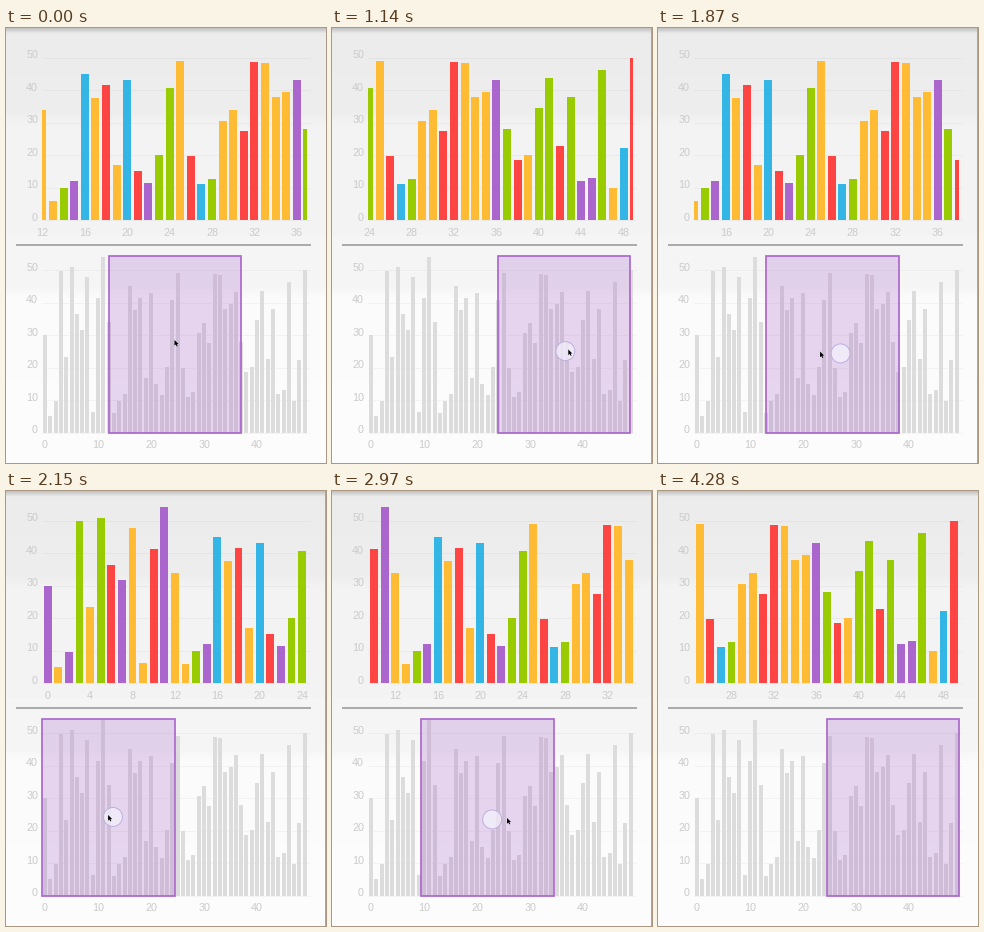
Animation, 320 px wide and 435 px high, one loop 4.35 s. Source, as a matplotlib script:

```python
import numpy as np
import matplotlib.pyplot as plt
from matplotlib.animation import FuncAnimation
from matplotlib.patches import Circle, Polygon, Rectangle

W, H, DPI = 320, 435, 80
LOOP, INTERVAL, STEP = 4350, 30, 90   # the picture moves once per STEP ms
LEFT, RIGHT = 36.4, 301.4
TOP_BASE, LOW_BASE = 192, 404.5
UNIT = 3.25                           # pixels per value
SPAN = 25                             # columns in view
BAR_FILL = 0.75
POINTER_LEAD = 60                     # ms the pointer runs ahead of the finger
VIOLET = "#AA66CC"
PALETTE = {"b": "#33B5E5", "v": VIOLET, "g": "#99CC00",
           "o": "#FFBB33", "r": "#FF4444"}

# The charted data set and the hue of each column
VALUES = [30, 5, 9.6, 49.8, 23.3, 50.8, 36.4, 31.6, 47.8, 6.2,
          41.3, 54.1, 34, 5.9, 9.7, 12, 45, 37.6, 41.4, 16.8,
          43, 15, 11.5, 20.1, 40.7, 49, 19.8, 11, 12.6, 30.5,
          33.7, 27.5, 48.7, 48.4, 38, 39.5, 43.2, 28, 18.5, 20.1,
          34.6, 43.6, 22.7, 37.9, 11.9, 13, 46.3, 9.7, 22.3, 50]
HUES = "vovgogrvoorvoogvborobrvggorbgoorrooovgroggrgvvgobr"
COUNT = len(VALUES)

# Turning points of the drag: time, first column in view, finger x, finger y
STOPS = np.array([(300, 12, 168.5, 314), (630, 12, 166, 315),
                  (1250, 24.5, 236.5, 323.5), (1600, 24.5, 246, 325),
                  (2230, -1.5, 102, 326), (2590, -1.5, 102, 326),
                  (3470, 26, 248, 332)])
EXIT_START, EXIT_TIME, EXIT_WAY = 3420, 600, np.array([75, 110])
ARROW = 0.8 * np.array([(0, 0), (0, 7), (1.7, 5.6), (2.9, 8),
                        (4, 7.5), (3, 5.1), (5, 5)])

fig = plt.figure(figsize=(W / DPI, H / DPI), dpi=DPI)
ax = fig.add_axes([0, 0, 1, 1])
ax.set_axis_off()


def drag(time):
    """First column and finger position, eased between the turning points."""
    times = STOPS[:, 0]
    i = np.clip(np.searchsorted(times, time) - 1, 0, len(times) - 2)
    u = np.clip((time - times[i]) / (times[i + 1] - times[i]), 0, 1)
    ease = u * u * (3 - 2 * u)
    first, *finger = STOPS[i, 1:] + ease * (STOPS[i + 1, 1:] - STOPS[i, 1:])
    return np.clip(first, -0.5, COUNT - SPAN - 0.5), np.array(finger)


def pointer_tip(time):
    u = np.clip((time - EXIT_START) / EXIT_TIME, 0, 1)
    return drag(time + POINTER_LEAD)[1] + (0, -2) + EXIT_WAY * u * (2 - u)


def label(x, y, value, align="center"):
    return ax.text(x, y, str(value), ha=align, va="baseline", color="#CBCBCB",
                   fontsize=10.8 * 72 / DPI, family="Liberation Sans", zorder=2)


def line(x0, x1, y, color, width):
    ax.plot([x0, x1], [y, y], color=color, lw=width * 72 / DPI,
            solid_capstyle="butt", zorder=1)


def place_bars(bars, first, span):
    """Lay out the columns from `first` on, cut off at the chart's sides."""
    pitch = (RIGHT - LEFT) / span
    for i, bar in enumerate(bars):
        center = LEFT + (i - first) * pitch
        half = pitch * BAR_FILL / 2
        x0, x1 = np.clip([center - half, center + half], LEFT, RIGHT)
        bar.set_x(x0)
        bar.set_width(x1 - x0)


def make_chart(base, colors):
    for value in range(0, 60, 10):
        y = base - value * UNIT
        line(36, 304, y, (0, 0, 0, 0.035), 1)
        label(32, y + 0.6, value, "right")
    bars = [Rectangle((0, base - v * UNIT), 0, v * UNIT, fc=c, lw=0, zorder=3)
            for v, c in zip(VALUES, colors)]
    for bar in bars:
        ax.add_patch(bar)
    return bars


shade = np.interp(np.arange(H), [0, 5, 84, 95, 258, 268, H],
                  [195, 235, 237, 242, 245, 250, 252])
ax.imshow(shade[:, None], cmap="gray", vmin=0, vmax=255,
          extent=(0, W, H, 0), aspect="auto", zorder=0)

top_bars = make_chart(TOP_BASE, [PALETTE[h] for h in HUES])
low_bars = make_chart(LOW_BASE, ["#DCDCDC"] * COUNT)
place_bars(low_bars, -0.5, COUNT)
line(10, 305, 217, "#ABABAB", 2)

LOW_PITCH = (RIGHT - LEFT) / COUNT
TOP_PITCH = (RIGHT - LEFT) / SPAN
for tick in range(0, COUNT, 10):
    label(LEFT + (tick + 0.5) * LOW_PITCH, 419.5, tick)
top_ticks = {tick: label(0, 208, tick) for tick in range(0, COUNT, 4)}

window = Rectangle((0, 228.3), SPAN * LOW_PITCH, 176.5, ec=VIOLET,
                   fc=(0.667, 0.4, 0.8, 0.26), lw=1.7 * 72 / DPI, zorder=4)
finger = Circle((0, 0), 9.5, fc=(0.96, 0.95, 0.99, 0.72), ec="#BBB0DF",
                lw=0.9, zorder=5)
pointer = Polygon(ARROW, fc="black", lw=0, zorder=6)
edge = Rectangle((318.5, 0), 1.5, H, fc="#A6A6A6", lw=0, zorder=6)
for patch in (window, finger, pointer, edge):
    ax.add_patch(patch)
ax.set_xlim(0, W)
ax.set_ylim(H, 0)


def draw(frame):
    now = frame * INTERVAL + 40
    moment = now // STEP * STEP
    first, finger.center = drag(moment)
    place_bars(top_bars, first, SPAN)
    for tick, text in top_ticks.items():
        x = LEFT + (tick - first) * TOP_PITCH
        text.set_x(x)
        text.set_visible(LEFT - 1 <= x <= RIGHT + 1)
    window.set_x(LEFT + (first + 0.5) * LOW_PITCH)
    finger.set_visible(670 <= now < 3600)
    pointer.set_xy(ARROW + pointer_tip(moment))
    edge.set_visible(670 <= now < 4280)
    return []


animation = FuncAnimation(fig, draw, frames=LOOP // INTERVAL,
                          interval=INTERVAL, repeat=True, repeat_delay=0)
plt.show()
```
